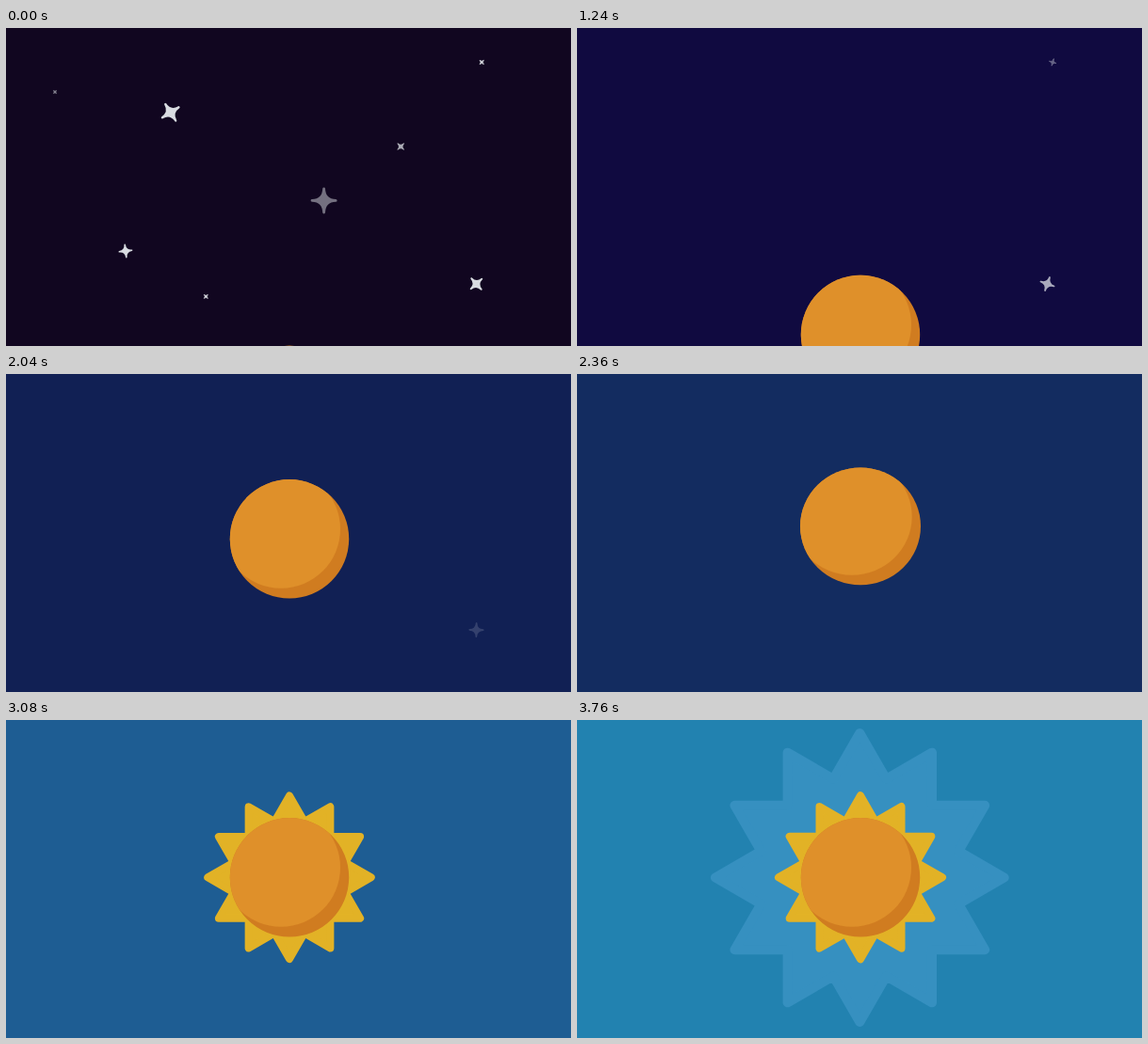
Write an HTML page that moves like this. It is 600 px wide and 338 px high and loops after 8000 ms.

```html
<!DOCTYPE html>
<html lang="en">
<head>
<meta charset="utf-8">
<title>Sunrise</title>
<style>
  html, body { margin: 0; width: 100%; height: 100%; overflow: hidden; background: #110620; }
  svg { display: block; width: 100%; height: 100%; }
</style>
</head>
<body>
<svg viewBox="0 0 600 338" preserveAspectRatio="xMidYMid slice" stroke-linejoin="round">
  <defs>
    <clipPath id="disc"><circle r="63.2"/></clipPath>
  </defs>
  <rect id="sky" width="600" height="338"/>
  <g id="stars" fill="#e4e8ec" stroke="#e4e8ec" stroke-width=".2"></g>
  <path id="halo" fill="#3690c0" stroke="#3690c0" stroke-width="5.8"/>
  <g id="sun">
    <path id="rays" fill="#e2b226" stroke="#e2b226" stroke-width="8"/>
    <circle r="63.2" fill="#d07c20"/>
    <circle cx="-9" cy="-10.5" r="63" fill="#df902a" clip-path="url(#disc)"/>
  </g>
</svg>
<script>
const LOOP = 8000, STEP = 40, END = 3760;
const el = id => document.getElementById(id);
const set = (node, attrs) => { for (const k in attrs) node.setAttribute(k, attrs[k]); };

const span = (t, from, to) => Math.min(1, Math.max(0, (t - from) / (to - from)));
const ease = (t, from, to) => (1 - Math.cos(Math.PI * span(t, from, to))) / 2;

// Night to day: each colour blends in linearly until its time.
const sky = [
  [0, "#110620"], [1240, "#100a40"], [2040, "#112054"],
  [2680, "#15386c"], [3400, "#257ab2"], [3760, "#2282b0"]
];
const channels = hex => [1, 3, 5].map(i => parseInt(hex.slice(i, i + 2), 16));
function skyColor(t) {
  const i = Math.max(1, sky.findIndex(([time]) => t <= time));
  const [from, a] = sky[i - 1], [to, b] = sky[i];
  const u = span(t, from, to), end = channels(b);
  return `rgb(${channels(a).map((c, k) => Math.round(c + (end[k] - c) * u))})`;
}

// Twelve points; this valley depth makes the edges of neighbours line up.
function burst(tip) {
  const points = Array.from({ length: 24 }, (_, i) => {
    const a = i * Math.PI / 12, r = i % 2 ? tip * Math.SQRT1_2 : tip;
    return `${(r * Math.sin(a)).toFixed(2)},${(-r * Math.cos(a)).toFixed(2)}`;
  });
  return `M${points.join("L")}Z`;
}
set(el("rays"), { d: burst(87) });
set(el("halo"), { d: burst(88.1) });

function makeStar([x, y, size, tilt, alpha = 0.95, end = 1000]) {
  const node = document.createElementNS("http://www.w3.org/2000/svg", "path");
  set(node, { d: "M0-.9Q.03-.03 .9 0Q.03 .03 0 .9Q-.03 .03-.9 0Q-.03-.03 0-.9Z" });
  el("stars").append(node);
  const turn = tilt > 0 ? -23 : 23;
  return t => {
    const s = t / 1000;
    const r = size * (1 + (8 - size) * 0.05 * s); // sizes drift together
    set(node, {
      transform: `translate(${x} ${y}) rotate(${tilt + turn * s}) scale(${r})`,
      opacity: alpha * (1 - span(t, 0, end) ** 2.5)
    });
  };
}
// x, y, size, tilt, then opacity and fade end where they differ
const stars = [
  [52, 68, 2.6, 45, 0.55, 720],
  [174.7, 89.7, 11.5, -32],
  [505.2, 36.4, 3.4, 45, 0.95, 1550],
  [419.2, 126, 5, 45, 0.75],
  [337.6, 183.4, 14, 0, 0.47],
  [127, 237, 7.5, -7],
  [212.3, 285.4, 3.2, 45],
  [499.5, 272, 8.8, 48, 0.95, 2200]
].map(makeStar);

function draw(time) {
  const t = Math.min(END, Math.floor(time % LOOP / STEP) * STEP);
  set(el("sky"), { fill: skyColor(t) });
  stars.forEach(star => star(t));

  // Rise slightly too far, sink back and squash once.
  const y = 401 - 240 * ease(t, 590, 2310) + 6.3 * ease(t, 2310, 2520);
  const squash = 1 + 0.057 * Math.sin(Math.PI * span(t, 2320, 2880));
  set(el("sun"), { transform: `translate(301 ${y}) scale(${squash} ${1 / squash})` });

  // Rays and halo both start hidden behind the disc.
  set(el("rays"), { transform: `scale(${0.67 + 0.33 * ease(t, 2440, 3120)})` });
  const reach = 158.4 * span(t, 2657, END);
  set(el("halo"), { transform: `translate(300.3 167.5) scale(${reach / 91})` });
}

const start = performance.now();
function tick() {
  draw(performance.now() - start);
  requestAnimationFrame(tick);
}
tick();
</script>
</body>
</html>
```
